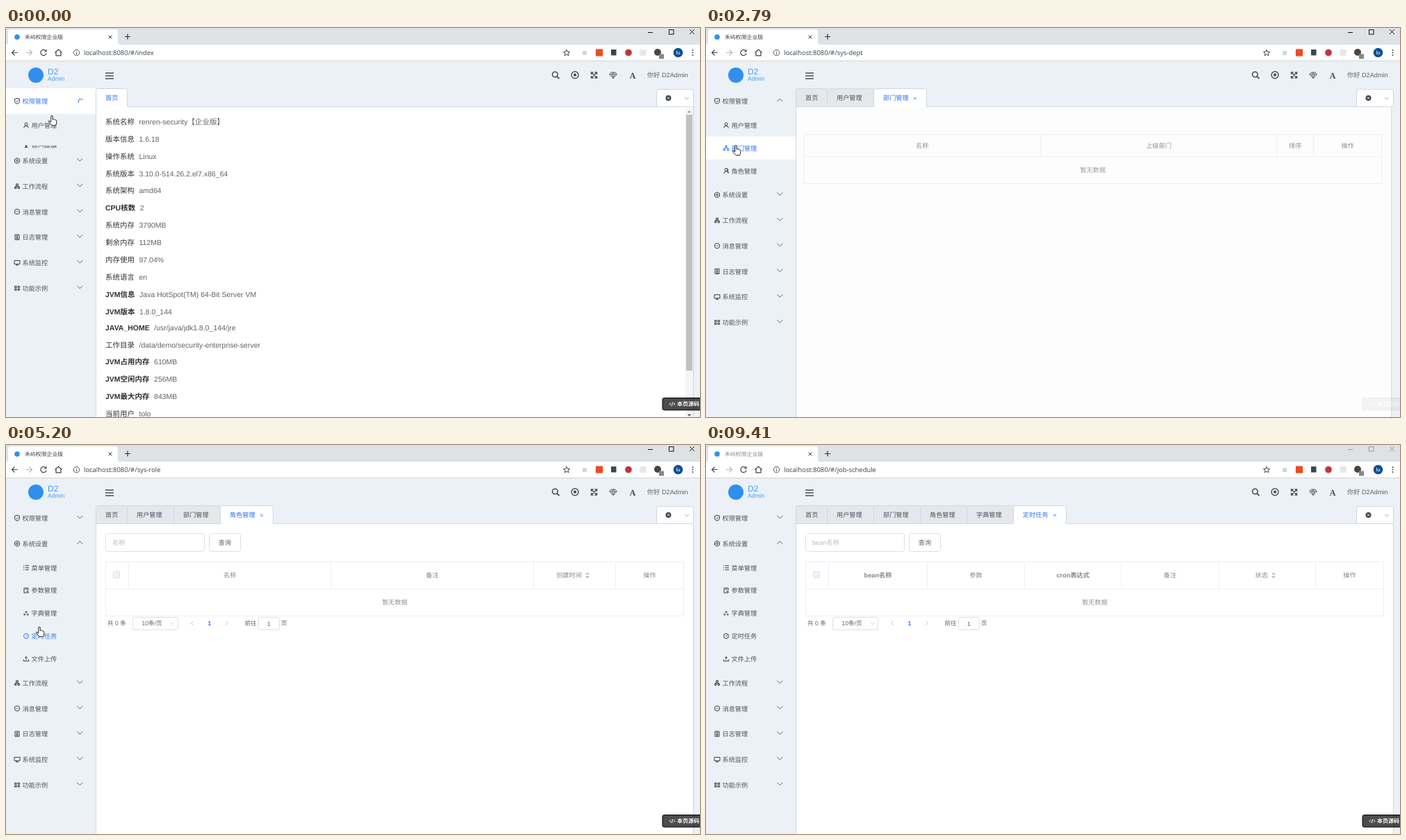
Animation of 999x561 px, one loop 9.51 s. Source, as an HTML page:

```html
<!DOCTYPE html>
<html lang="zh-CN">
<head>
<meta charset="utf-8">
<title>权限管理</title>
<style>
html, body { margin: 0; width: 100%; height: 100%; overflow: hidden; background: #ebf1f6; }
#stage { display: block; width: 100vw; height: 100vh; }
text { font-family: "Liberation Sans", "Noto Sans CJK SC", "Noto Sans CJK", sans-serif; text-rendering: geometricPrecision; white-space: pre; }
.url { font-family: "Open Sans", sans-serif; }
</style>
</head>
<body>
<svg id="stage" viewBox="0 0 999 561"><g id="base"></g><g id="live"></g></svg>
<script>
const LOOP = 9510, BLUE = '#2f74ff', INK = '#505459', LINE = '#ebeef5', EDGE = '#cfd7e5';

// drawing helpers; text is placed by its vertical centre
const text = (x, y, s, size = 9.2, fill = INK, extra = '') =>
  `<text x="${x}" y="${y + size * .37}" font-size="${size}" fill="${fill}" ${extra}>${s}</text>`;
const mid = (x, y, s, size, fill, extra = '') => text(x, y, s, size, fill, 'text-anchor="middle" ' + extra);
const rect = (x, y, w, h, fill, extra = '') =>
  `<rect x="${x}" y="${y}" width="${w}" height="${h}" fill="${fill}" ${extra}/>`;
const box = (x, y, w, h, fill, line, r = 0) => rect(x, y, w, h, fill, `stroke="${line}" rx="${r}"`);
const path = (d, color, w = 1, x = 0, y = 0, turn = 0, fill = 'none') =>
  `<path d="${d}" fill="${fill}" stroke="${color}" stroke-width="${w}" transform="translate(${x} ${y}) rotate(${turn})"/>`;
const disc = (x, y, r, fill, extra = '') => `<circle cx="${x}" cy="${y}" r="${r}" fill="${fill}" ${extra}/>`;
const ring = (x, y, r, color, w = 1) => disc(x, y, r, 'none', `stroke="${color}" stroke-width="${w}"`);
const weight = s => `font-weight="${/[a-z]/i.test(s) ? 700 : 500}"`;
const cross = (x, y, r, color, w) => path(`M${-r} ${-r}L${r} ${r}M${r} ${-r}L${-r} ${r}`, color, w, x, y);
const chevron = (x, y, r, color, turn = 0) => path(`M${-r} ${-r / 2}L0 ${r / 2} ${r} ${-r / 2}`, color, .9, x, y, turn);

// motion helpers
const bezier = (x1, y1, x2, y2) => p => {
  if (p <= 0) return 0;
  if (p >= 1) return 1;
  const at = (a, b, u) => 3 * a * u * (1 - u) ** 2 + 3 * b * u * u * (1 - u) + u ** 3;
  let lo = 0, hi = 1;
  for (let i = 0; i < 20; i++) {
    const u = (lo + hi) / 2;
    at(x1, x2, u) < p ? lo = u : hi = u;
  }
  return at(y1, y2, lo);
};
const ease = bezier(.25, .1, .25, 1), easeInOut = bezier(.42, 0, .58, 1);

// pages
const button = x => box(x + .5, 127.5, 45, 26, '#fff', '#dcdfe6', 3) + mid(x + 23, 140.5, '查询', 9.2, '#606266');
const input = (x, hint) => box(x + .5, 127.5, 142, 26, '#fff', '#dcdfe6', 3) + text(x + 10, 140.5, hint, 9.2, '#b8bcc5');
const search = hints => hints.map((h, i) => input(143 + 149 * i, h)).join('') + button(143 + 149 * hints.length);
const sorter = (x, y) => `<path d="M${x - 3} ${y - 1.2}l3-3 3 3zM${x - 3} ${y + 1.2}l3 3 3-3z" fill="#b4b8c0"/>`;

// a trailing * marks a sortable column
function table(top, split, bottom, edges, heads) {
  const y = (top + split) / 2;
  let out = box(143.5, top, 832, bottom - top, '#fff', LINE) + path(`M143.5 ${split}H975.5`, LINE);
  heads.forEach((head, i) => {
    const left = edges[i], right = edges[i + 1] || 975.5, c = (left + right) / 2;
    const label = head.replace('*', ''), sortable = label !== head;
    if (left > 144) out += path(`M${left} ${top}V${split}`, LINE);
    out += mid(sortable ? c - 8 : c, y, label, 9.2, '#85888e', weight(label));
    if (sortable) out += sorter(c + label.length * 4.6, y);
  });
  return out + mid(559.5, (split + bottom) / 2, '暂无数据', 9.2, '#909399');
}

const pager = text(146, 257, '共 0 条', 8.6, '#606266') +
  box(182.5, 248.5, 65, 18, '#fff', '#dcdfe6', 2) + mid(210, 257, '10条/页', 8.6, '#606266') +
  chevron(239.5, 257.5, 2.6, '#c0c4cc') + chevron(268, 257, 3, '#b4b8c0', 90) +
  mid(293, 257, '1', 8.6, BLUE, 'font-weight="700"') + chevron(318, 257, 3, '#b4b8c0', -90) +
  text(343.5, 257, '前往', 8.6, '#606266') + box(363.5, 248.5, 30, 18, '#fff', '#dcdfe6', 2) +
  mid(378.5, 257.5, '1', 8.6, '#606266') + text(396, 257, '页', 8.6, '#606266');
const listPage = (hints, edges, heads) => search(hints) + table(168.5, 207.5, 246.5, [176.5, ...edges], heads) +
  box(154.5, 182.5, 9, 9, '#edf2fc', '#dcdfe6', 1) + pager;

const info = ['系统名称|renren-security【企业版】', '版本信息|1.6.18', '操作系统|Linux', '系统版本|3.10.0-514.26.2.el7.x86_64',
  '系统架构|amd64', 'CPU核数|2', '系统内存|3790MB', '剩余内存|112MB', '内存使用|97.04%', '系统语言|en',
  'JVM信息|Java HotSpot(TM) 64-Bit Server VM', 'JVM版本|1.8.0_144', 'JAVA_HOME|/usr/java/jdk1.8.0_144/jre',
  '工作目录|/data/demo/security-enterprise-server', 'JVM占用内存|610MB', 'JVM空闲内存|256MB', 'JVM最大内存|843MB', '当前用户|tolo'];
const home = info.map((row, i) => {
  const [label, value] = row.split('|');
  return text(143, 135 + 24.9 * i - (i > 11 ? 2 : 0), `<tspan ${weight(label)} fill="#303133">${label}</tspan><tspan dx="6.5">${value}</tspan>`, 10.5, '#606266');
}).join('') + rect(978, 115, 11, 446, '#f4f5f6') + rect(979, 125, 9, 369, '#c1c1c1') +
  '<path d="M981 122l2.5-3 2.5 3z" fill="#999"/><path d="M981 557l2.5 3 2.5-3z" fill="#505050"/>';

const routes = [
  { at: -1e4, url: 'index', tab: '首页', body: home },
  { at: 540, url: 'sys-user', tab: '用户管理', body: listPage(['用户名'], [294.5, 411, 527.5, 643.5, 759.5, 877.5],
    ['用户名*', '所属部门', '邮箱', '手机号*', '状态*', '创建时间*', '操作']) },
  { at: 2230, url: 'sys-dept', tab: '部门管理', body: table(153.5, 185.5, 224.5, [143.5, 484.5, 824.5, 877.5], ['名称', '上级部门', '排序', '操作']) },
  { at: 3780, url: 'sys-role', tab: '角色管理', body: listPage(['名称'], [468, 759.5, 877.5], ['名称', '备注', '创建时间*', '操作']) },
  { at: 5940, url: 'sys-dict', tab: '字典管理', body: listPage(['名称', '类型'], [322.5, 468, 613.5, 759.5, 877.5],
    ['名称', '类型', '排序*', '备注', '创建时间*', '操作']) },
  { at: 7220, url: 'job-schedule', tab: '定时任务', body: listPage(['bean名称'], [318.5, 458.5, 598, 738, 877.5],
    ['bean名称', '参数', 'cron表达式', '备注', '状态*', '操作']) }
];

function page({ body }, alpha, dx) {
  return `<g opacity="${alpha}" transform="translate(${dx})">${box(129.5, 113.5, 860, 460, '#fff', EDGE)}${body}</g>`;
}

function pages(i, age) {
  const a = age - 70;
  if (a < 0) return page(routes[i - 1], 1, 0);
  const out = ease(a / 300), enter = ease((a - 300) / 300);
  return a < 300 && i ? page(routes[i - 1], 1 - out, 30 * out) : page(routes[i], enter, -30 * (1 - enter));
}

function tabs(active) {
  let x = 129.5, out = '';
  routes.slice(0, active + 1).forEach(({ tab }, i) => {
    const on = i === active, w = i ? (on ? 76 : 67) : 45;
    out += path(`M0 26V3Q0 0 3 0H${w - 3}Q${w} 0 ${w} 3V26${on ? '' : 'Z'}`, EDGE, 1, x, 87.5, 0, on ? '#fff' : '#e4e8ed');
    if (on) out += rect(x + .5, 112, w - 1, 3, '#fff');
    out += text(x + 13.5, 101, tab, 9.2, on ? BLUE : INK);
    if (on && i) out += cross(x + 59.5, 101.5, 1.9, BLUE, .8);
    x += w;
  });
  return out;
}

// sidebar
const dot = (x, y, r = 1.3) => `M${x - r} ${y}a${r} ${r} 0 1 0 ${2 * r} 0a${r} ${r} 0 1 0 ${-2 * r} 0`;
const user = dot(0, -1.5, 2) + 'M-3.3 4Q-3 .8 0 .8T3.3 4';
const menu = [
  ['权限管理', 'M-3.4-3L0-4 3.4-3V1Q3 3 0 4Q-3 3-3.4 1ZM-1.5 0L-.3 1.2 1.8-1.2',
    [['用户管理', user], ['部门管理', 'M-1-3.5h2v2h-2zM-3.7 1.5h2v2h-2zM1.7 1.5h2v2h-2zM0-1.5V0M-2.7 1.5V0H2.7V1.5'], ['角色管理', user + 'M1-3.5Q4-2 2 .5L3.8 2']]],
  ['系统设置', 'M0-4L3.5-2V2L0 4-3.5 2V-2Z' + dot(0, 0, 1.4),
    [['菜单管理', 'M-1.5-3H4M-1.5 0H4M-1.5 3H4M-4-3h1M-4 0h1M-4 3h1'], ['参数管理', 'M3 0V-3.5H-3V3.5H0M-1.5-1.5H1.5' + dot(2, 2.3)],
      ['字典管理', dot(0, -1.8, 1) + dot(-2.3, 1.8, 1) + dot(2.3, 1.8, 1)], ['定时任务', dot(0, 0, 3.6) + 'M0 1L1.7-1.4M-2 0h.5'],
      ['文件上传', 'M-3.7 1V3.3H3.7V1M0 1.5V-3M-1.7-1.4L0-3 1.7-1.4']]],
  ['工作流程', 'M-1.5-3.3h3v2h-3zM-3.5 1.3h2.4v2h-2.4zM1.1 1.3h2.4v2H1.1zM0-1V.2M-2.5 1V.2H2.5V1'],
  ['消息管理', dot(0, 0, 3.7) + 'M-2 0h.9M-.4 0h.9M1.2 0h.9'],
  ['日志管理', 'M-3-3.6H3V3.6H-3ZM-1.5-1.8H1.5M-1.5 2.2H1.5' + dot(0, .4, 1)],
  ['系统监控', 'M-4-3H4V2H-4ZM0 2V3.6M-2 3.6H2'],
  ['功能示例', 'M-3.5-2.8h2.6v2h-2.6zM-3.5 1h2.6v2h-2.6zM1-2.8h2.6v2H1zM1 1h2.6v2H1z']
];

const hovers = [[-1e4, '权限管理'], [90, '用户管理'], [1880, '部门管理'], [3400, '角色管理'], [4800, '系统设置'],
  [4960, ''], [5185, '定时任务'], [5330, '字典管理'], [6950, '定时任务'], [8240, '文件上传'], [8330, '']];

function hoverState(t) {
  let i = hovers.length - 1;
  while (hovers[i][0] > t) i--;
  const [at, now] = hovers[i], before = i ? hovers[i - 1][1] : '', p = ease((t - at) / 300);
  return { now, shade: name => name === now ? p : name === before ? 1 - p : 0 };
}

function sidebar(t) {
  const { now, shade } = hoverState(t);
  const first = (Math.max(t, 60) + 90) / 300, second = (t - 4840) / 300;
  const open = [first, second], fold = second > 0 ? 1 - easeInOut(second) : easeInOut(first);
  const grown = [fold, easeInOut(second)];
  const turned = [second > 0 ? 1 - ease(second) : ease(open[0]), ease(second)];
  const row = (name, icon, x, y, h, sub) => rect(0, y, 129, h, '#fff', `opacity="${shade(name)}"`) +
    path(icon, sub && name === now ? BLUE : '#303133', .95, x, y + h / 2) +
    text(x + 7.5, y + h / 2 + .3, name, 9.2, name === now ? BLUE : INK);
  let y = 87, out = rect(0, 87, 129, 474, '#ebf1f6');
  menu.forEach(([name, icon, subs], i) => {
    out += row(name, icon, 16, y, 36.75) + chevron(106.3, y + 17, 4, name === now ? BLUE : INK, 180 * (turned[i] || 0));
    y += 36.75;
    const h = subs ? subs.length * 32.85 * grown[i] : 0;
    if (h > 0) out += `<svg x="0" y="${y}" width="129" height="${h}">${subs.map((s, k) => row(s[0], s[1], 29, k * 32.85, 32.85, true)).join('')}</svg>`;
    y += h;
  });
  return out;
}

// pointer: time, x, y
const moves = [[0, 66, 126], [60, 66, 126], [370, 47, 140], [1780, 47, 140], [2050, 43, 169], [3250, 43, 169], [3600, 61, 208],
  [4760, 61, 208], [4850, 52, 238], [5200, 48, 262], [5500, 51, 233], [6910, 51, 233], [7040, 59, 288], [8190, 59, 288],
  [8450, 150, 370], [9020, 1000, 562]];

function pointer(t) {
  const i = moves.findIndex(m => m[0] > t);
  if (i < 0) return '';
  const [a, x, y] = moves[i - 1], [b, x2, y2] = moves[i], p = (t - a) / (b - a);
  const px = x + (x2 - x) * p, py = y + (y2 - y) * p;
  return px < 129
    ? path('M-1.2 1Q0-.8 1.2 1V6Q2.4 4.8 3.4 6Q4.6 5.3 5.2 6.7Q6.7 6.3 6.8 8V11L5.5 14.5H0L-4.5 9Q-4.6 7.3-3 8L-1.2 9.6Z', '#111', .9, px, py, 0, '#fff')
    : path('M0 0V12L3 9.3 5 13.5 6.7 12.7 4.8 8.7H8.5Z', '#111', .8, px, py, 0, '#fff');
}

function sourceLink(age) {
  const b = age - 40, alpha = b < 500 ? 1 - ease(b / 300) : ease((b - 500) / 300);
  return `<g opacity="${alpha}">${rect(945, 533.5, 62, 17.5, '#000', 'fill-opacity=".7" stroke="#000" rx="2.5"')}` +
    path('M-2-2L-4 0-2 2M2-2L4 0 2 2M.8-2.8L-.8 2.8', '#fff', 1, 959, 542.3) +
    text(966, 542.3, '本页源码', 8, '#fff', 'font-weight="700"') + '</g>';
}

const spinner = age => age < 450
  ? path('M-4.3 4.3A6.1 6.1 0 0 1 4.3-4.3', '#409eff', 1.4, 986.5, 64.3, 20 + age * .9) : '';

function titleBar(focused) {
  const c = focused ? '#111' : '#999';
  return text(27, 13, '禾屿权限企业版', 7.9, focused ? '#3c4043' : '#85888c') + path('M924 6.5H931', c) +
    box(954.5, 2.5, 6.5, 6.5, 'none', c) + cross(987.5, 5.5, 3.3, c);
}

const HEAD = '#4a4e54';
base.innerHTML = rect(0, 0, 999, 561, '#ebf1f6') + rect(0, 0, 999, 24, '#dee1e6') + rect(0, 24, 999, 23, '#fff') +
  rect(0, 47, 999, 1, '#d3d6da') + path('M0 24Q3 24 3 20V6Q3 2 7 2H157Q161 2 161 6V20Q161 24 164 24Z', 'none', 0, 0, 0, 0, '#fff') +
  disc(16, 13, 3.8, '#2f8fef') + cross(150, 13, 2.4, '#333') + path('M171 12.5H179M175 8.5V16.5', '#333', 1.2) +
  // toolbar
  path('M16.5 35.5H8.5M12-4M12.5 31.5L8.5 35.5 12.5 39.5', '#444', 1.2) + path('M29 35.5H37M33.5 31.5L37.5 35.5 33.5 39.5', '#b5b7ba', 1.2) +
  path('M3.2-2.6A4.1 4.1 0 1 0 4 1M4-4.5V-1.5H1', '#444', 1.2, 54, 35.5) + path('M-5 0L0-4.5 5 0M-3.5-1V4.3H3.5V-1', '#444', 1.2, 75.5, 35.5) +
  ring(101.5, 35.5, 4.2, '#555') + path('M101.5 35V38M101.5 33V34', '#555') +
  path('M0-4.6L1.3-1.5 4.6-1.3 2 .8 2.9 4 0 2.2-2.9 4-2 .8-4.6-1.3-1.3-1.5Z', '#444', 1, 807, 35.8) +
  rect(830, 33, 6, 6, '#d4d6d8') + disc(854, 35.5, 7, '#f1f2f3') + rect(849, 30.5, 10, 10, '#ee4b20') +
  rect(871, 31, 7.5, 8.5, '#3a4653') + disc(896, 35.5, 7, '#f1f2f3') + disc(896, 35.5, 4.8, '#c0353a') +
  rect(912.5, 31, 9, 9, '#e6e7e9') + disc(938, 35, 5, '#4b4540') + rect(940, 37.5, 7, 7, '#85888c') +
  disc(967.5, 35.5, 6.8, '#0b4f9a') + mid(967.5, 35.2, 'lu', 7.5, '#fff') + [32, 35.5, 39].map(y => disc(988.5, y, 1, '#444')).join('') +
  // app header
  disc(43, 68, 11, '#2f8fef') + text(60, 63, 'D2', 12, '#409eff') + text(60, 73.3, 'Admin', 8.6, '#409eff') +
  path('M143 65H155M143 69H155M143 73H155', HEAD, 1.7) +
  ring(790.3, 67, 3.8, HEAD, 1.6) + path('M793 70L796.5 73', HEAD, 1.8) + ring(819, 67.7, 5, HEAD, 1.4) + disc(819, 67.7, 2.1, HEAD) +
  path('M-3.5-3.5L3.5 3.5M3.5-3.5L-3.5 3.5M-4-1V-4H-1M1-4H4V-1M4 1V4H1M-1 4H-4V1', HEAD, 1.4, 846.5, 68) +
  path('M-3-4H3L5.3-1 0 4.6-5.3-1ZM-5-1H5M0-4L-2-1 0 4.4 2-1Z', HEAD, .9, 874, 68) +
  mid(902, 68, 'A', 12.5, HEAD, 'font-weight="700" style="font-family:\'Liberation Serif\',serif"') + text(923, 68, '你好 D2Admin', 9.2, '#606266');

const tabControl = path('M936.5 113.5V91Q936.5 88.5 939 88.5H987Q989.5 88.5 989.5 91V113.5Z', EDGE, 1, 0, 0, 0, '#fff') +
  disc(953.5, 101, 4, '#44484d') + cross(953.5, 101, 1.4, '#fff', 1) + chevron(980, 101.5, 2.8, '#9a9da3');

const start = performance.now();
function draw(now) {
  const t = Math.max(0, now - start) % LOOP;
  let i = routes.length - 1;
  while (routes[i].at > t) i--;
  const age = t - routes[i].at;
  live.innerHTML = titleBar(t < 9410) + text(112, 35.2, 'localhost:8080/#/' + routes[i].url, 9.45, '#3c4043', 'class="url"') +
    pages(i, age) + tabs(age < 70 ? i - 1 : i) + tabControl + sidebar(t) + path('M129.5 114V561', EDGE) +
    spinner(age) + sourceLink(age) + pointer(t);
  requestAnimationFrame(draw);
}
draw(start);
</script>
</body>
</html>
```
